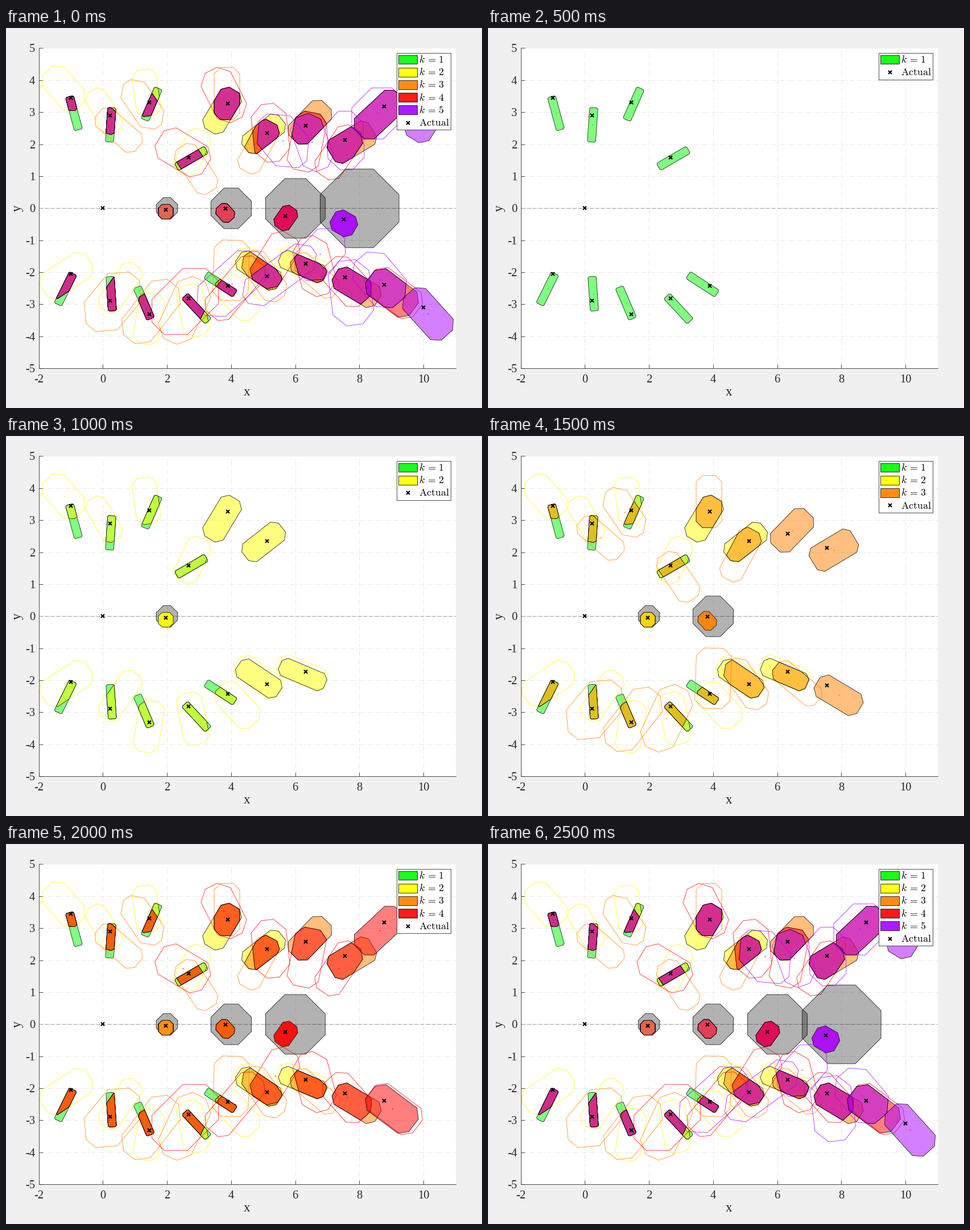
A matplotlib script that plays this animation: 837 by 669 pixels, repeating every 3 s.

```python
import math

import matplotlib.pyplot as plt
from matplotlib.animation import FuncAnimation
from matplotlib.patches import Polygon, Rectangle

W, H, DPI = 837, 669, 64
PT = 72 / DPI  # points per pixel
LEFT, RIGHT, TOP, BOTTOM = 57.5, 790.5, 35, 598.5
INK = "#262626"
COLORS = {1: (0, 1, 0), 2: (1, 1, 0), 3: (1, .5, 0), 4: (1, 0, 0), 5: (.667, 0, 1)}
LAST = 5

plt.rcParams["mathtext.fontset"] = "cm"
fig = plt.figure(figsize=(W / DPI, H / DPI), dpi=DPI, facecolor="#f0f0f0")
ax = fig.add_axes([LEFT / W, 1 - (BOTTOM + .5) / H,
                   (RIGHT - LEFT) / W, (BOTTOM - TOP) / H])
# data units are stage pixels
ax.set_xlim(LEFT, RIGHT)
ax.set_ylim(BOTTOM, TOP)
ax.set_axisbelow(True)

shown_from = []   # (first step, artist)
shown_only = []   # (step, artist)


# ---------- geometry ----------
def cell(cx, cy, a, b, deg, cut=.5):
    """Turned box of half sizes a, b whose corners lose cut * b."""
    c, s = math.cos(math.radians(deg)), math.sin(math.radians(deg))
    k = cut * b
    half = [(a, k - b), (a, b - k), (a - k, b), (k - a, b)]
    return [(cx + u * c - v * s, cy + u * s + v * c)
            for u, v in half + [(-u, -v) for u, v in half]]


def bar(cx, cy, deg):
    return cx, cy, 30.3, 7.3, deg, .28


def intersect(poly, clip):
    """Intersection of two convex polygons."""
    for a, b in zip(clip, clip[1:] + clip[:1]):
        def side(p):
            return (b[0] - a[0]) * (p[1] - a[1]) - (b[1] - a[1]) * (p[0] - a[0])

        out = []
        for p, q in zip(poly, poly[1:] + poly[:1]):
            dp, dq = side(p), side(q)
            if dp >= 0:
                out.append(p)
            if dp * dq < 0:
                t = dp / (dp - dq)
                out.append((p[0] + t * (q[0] - p[0]), p[1] + t * (q[1] - p[1])))
        poly = out
    return poly


# ---------- drawing ----------
def fill(poly, step, color, alpha):
    patch = Polygon(poly, facecolor=(*color, alpha), edgecolor="k",
                    linewidth=.7 * PT, zorder=step)
    shown_from.append((step, ax.add_patch(patch)))


def outline(poly, step):
    patch = Polygon(poly, fill=False, edgecolor=COLORS[step],
                    linewidth=.7 * PT, zorder=step)
    shown_from.append((step, ax.add_patch(patch)))


def dot(x, y, step):
    color = (.2, .85, .2) if step == 1 else COLORS[step]
    line, = ax.plot(x, y, "o", color=color, ms=1.8 * PT, mew=0, zorder=step + .5)
    shown_only.append((step, line))


def cross_mark(x, y, step):
    line, = ax.plot(x, y, "x", color="k", ms=5.2 * PT, mew=2.1 * PT, zorder=10)
    shown_from.append((step, line))


def landmark(col, y, first, *sets, rim=None):
    """Estimate of one landmark, narrowed by each newly measured set."""
    estimate = None
    for step in range(first, LAST + 1):
        i = step - first
        if i < len(sets):
            measured = cell(*sets[i])
            if i or rim:
                outline(measured if i else cell(*rim), step)
            dot(*sets[i][:2], step)
            estimate = intersect(estimate, measured) if i else measured
        fill(estimate, step, COLORS[step], .5)
    cross_mark(114 + 68.9 * col, y, first)


def vehicle(step, mark, body):
    n = step - 2
    half = 18.8 + 16.85 * n
    fill(cell(283 + 112.9 * n, 317, half, half, 0, .65), step, (0, 0, 0), .3)
    shape = cell(*body)
    fill(shape, step, COLORS[step], .9)
    for later in range(step + 1, LAST + 1):
        fill(shape, later, COLORS[later], .3)
    cross_mark(*mark, step)


# ---------- axes ----------
def serif(x, y, text, size=20.5, **kw):
    ax.text(x, y, text, family="Liberation Serif", fontsize=size * PT,
            color=INK, **kw)


ux, uy = (RIGHT - LEFT) / 13, (BOTTOM - TOP) / 10
xs = {v: LEFT + (v + 2) * ux for v in range(-2, 11, 2)}
ys = {v: TOP + (5 - v) * uy for v in range(-5, 6)}
ax.set_xticks(list(xs.values()), [])
ax.set_yticks(list(ys.values()), [])
ax.tick_params(direction="in", length=7 * PT, width=.8 * PT, color=INK)
ax.grid(color="#e2e2e2", lw=.8 * PT, ls=(0, (9, 4, 2, 4)))
for side in ("top", "right"):
    ax.spines[side].set_visible(False)
for side in ("left", "bottom"):
    ax.spines[side].set(color=INK, linewidth=.8 * PT)
for v, x in xs.items():
    serif(x, 624, str(v), ha="center")
for v, y in ys.items():
    serif(51, y + 7, str(v), ha="right")
serif(424, 647, "x", 23, ha="center")
serif(20.5, 317, "y", 23, ha="center", va="center", rotation=90)
ax.plot([LEFT, RIGHT], [317, 317], color="#9a9a9a", lw=PT, ls=(0, (7, 3)), zorder=.9)

# ---------- vehicle ----------
cross_mark(170, 317, 1)
vehicle(2, (281, 320), (281, 323, 13, 13, 90))
vehicle(3, (385.5, 317.5), (385.5, 325, 16.5, 13.5, 48))
vehicle(4, (491, 331), (492, 334, 22, 16, -55))
vehicle(5, (594, 336.5), (594, 343.5, 22.5, 20.5, 30))

# ---------- upper landmarks: centre, half sizes, angle, corner cut ----------
landmark(0, 123, 1, bar(119.5, 149.5, 74.9), (101.5, 106, 42, 25.5, 48.8, .55))
landmark(1, 154, 1, bar(184, 170, 93.8), (172.5, 146, 42, 19.5, 60),
         (198, 179, 46, 21, 41))
landmark(2, 131, 1, bar(256, 133.5, 113.6), (247, 113.5, 41, 21.5, 82),
         (240, 134, 48, 25, 55.6, .7))
landmark(3, 228, 1, bar(326, 229, 149.8), (328, 218, 41.5, 22, 115),
         (334.5, 247.5, 47, 22, 56), (311, 218.5, 48, 31, 31))
landmark(4, 133, 2, (380, 145, 42, 21, 121), (388.5, 115, 46, 22.5, 90),
         (383, 117.5, 49, 29, 63, .6))
landmark(5, 185, 2, (453, 186, 41, 20, -38), (444, 208.5, 49, 21.5, 118),
         (465, 184, 51, 31, 84, .65), (487, 198, 54, 38, 50, .75))
landmark(6, 172, 3, (534.5, 165.5, 42, 23.3, -46), (529, 199.5, 52, 28, 101),
         (538, 201, 50.5, 28.5, 70, .6))
landmark(7, 196.5, 3, (608, 200.5, 42.5, 24, -31, .4), (585, 218.5, 50, 26, 124),
         (597, 197.5, 51.5, 32, 88, .65))
landmark(8, 138, 4, (656.5, 152, 49, 25, -43), (653, 150, 50, 39, -45, .65))
landmark(9, 130, 5, (740, 155, 47, 26, -58))

# ---------- lower landmarks ----------
landmark(0, 433, 1, bar(104.5, 459, 116.1), (106, 435, 48, 25.5, -34))
landmark(1, 480, 1, bar(185, 467.3, 86.2), (201, 457, 48, 20.5, 125),
         (187.5, 481.5, 59, 38, 130, .7))
landmark(2, 504, 1, bar(242.5, 483.5, 66.9), (251, 511, 45.5, 22.5, 99),
         (255, 498.5, 62, 32, 128, .6))
landmark(3, 475.5, 1, bar(335, 493.5, 47.1), (328.5, 497, 46, 23, 79),
         (314, 496.5, 60, 32, 115, .6), (315, 481, 67, 44, 135, .65))
landmark(4, 453.5, 1, bar(377.2, 450.7, 33), (407, 473.5, 44, 25, 48),
         (396, 426, 53, 31, 92, .45), (402.5, 457.5, 63, 27, -50),
         (396.5, 449.5, 72, 36, -42, .7))
landmark(5, 437, 2, (444.5, 426.5, 43, 19, 34), (454, 436, 49, 24, 55, .6),
         (473, 408, 51, 29, -58), (481, 434, 74, 28, -36, .7),
         rim=(444, 423.5, 46, 22, 35))
landmark(6, 415, 2, (521.5, 419.5, 43, 16.5, 23), (543.5, 435, 48, 20.5, 40),
         (542.5, 418.5, 53, 31, 75, .65), (552, 398, 50, 33, -48, .6),
         rim=(521, 416, 45, 20, 22))
landmark(7, 438.5, 3, (616.5, 456, 44, 22, 31), (599.5, 446, 46, 30, 48),
         (606.5, 465.5, 57, 36, 83, .6))
landmark(8, 451.5, 4, (678.5, 466, 48, 28, 37), (657, 443, 52, 36, 50, .6),
         rim=(683, 466, 51, 29, 37))
landmark(9, 491.5, 5, (742, 503, 50, 27, 48))


# ---------- legend ----------
def legend(step):
    def put(artist):
        artist.set_zorder(20)
        shown_only.append((step, artist))

    def label(row, text):
        put(ax.text(725.5, 60.5 + 22.2 * row, text, fontsize=17.9 * PT, color="k"))

    put(ax.add_patch(Rectangle((686.5, 43.5), 95, 25 + 22 * step, facecolor="w",
                               edgecolor=INK, lw=.8 * PT)))
    for row in range(step):
        put(ax.add_patch(Rectangle((690, 47.2 + 22.2 * row), 33, 15.8,
                                   facecolor=(*COLORS[row + 1], .9),
                                   edgecolor="k", lw=.8 * PT)))
        label(row, rf"$k\,=\,{row + 1}$")
    put(ax.plot(706.5, 55.3 + 22.2 * step, "x", color="k",
                ms=5.2 * PT, mew=2.1 * PT)[0])
    label(step, r"$\mathrm{Actual}$")


for n in COLORS:
    legend(n)


def update(i):
    step = i or LAST  # the loop opens on the finished picture
    for first, artist in shown_from:
        artist.set_visible(first <= step)
    for only, artist in shown_only:
        artist.set_visible(only == step)
    return []


anim = FuncAnimation(fig, update, frames=6, interval=500, init_func=lambda: [],
                     repeat=True, repeat_delay=0, blit=False)
plt.show()
```
